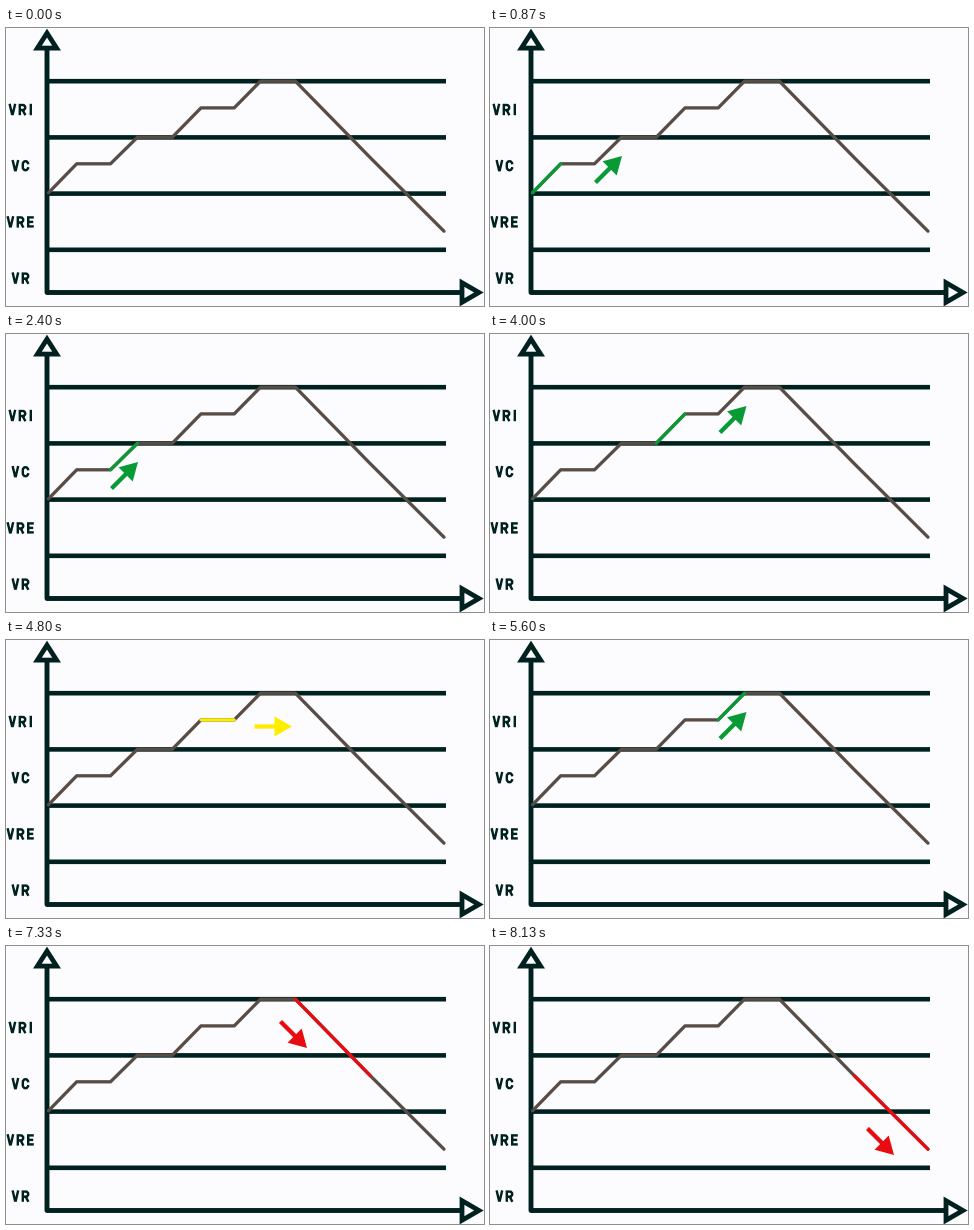
Write a matplotlib script that moves like this. It is 478 by 278 pixels and loops after 8.79 s.

```python
import matplotlib.pyplot as plt
from matplotlib.animation import FuncAnimation
from matplotlib.patches import PathPatch, Polygon
from matplotlib.path import Path
import numpy as np

W, H = 478, 278
DPI = 64
PX = 72 / DPI  # points per pixel
LOOP, STEP = 8790, 15

PAPER = "#fcfcff"
INK = "#00211f"
BROWN = "#584d46"
GREEN = "#079a35"
YELLOW = "#ffed00"
RED = "#e80b10"

fig = plt.figure(figsize=(W / DPI, H / DPI), dpi=DPI, facecolor=PAPER)
ax = fig.add_axes([0, 0, 1, 1])
ax.set_xlim(0, W)
ax.set_ylim(H, 0)
ax.axis("off")


def line(points, color, width, cap="butt", z=2):
    xs, ys = zip(*points)
    return ax.plot(xs, ys, color=color, lw=width * PX, zorder=z, snap=False,
                   solid_capstyle=cap, solid_joinstyle="round")[0]


def axis_head(points):
    ax.add_patch(Polygon(points, fc=PAPER, ec=INK, lw=4.8 * PX, snap=False,
                         joinstyle="miter", zorder=3))


# Letter strokes about 6 wide and 11 high: M move, L line, Q quadratic curve
GLYPHS = {
    "V": [("M", 0.2, -1.2), ("L", 2.6, 9), ("L", 3.4, 9), ("L", 5.8, -1.2)],
    "R": [("M", 0, 10.2), ("L", 0, 0), ("L", 3, 0), ("Q", 5.4, 0, 5.4, 2.5),
          ("Q", 5.4, 5, 3, 5), ("L", 0, 5), ("M", 2.8, 5), ("L", 5.6, 10.2)],
    "I": [("M", 0.6, -1.2), ("L", 0.6, 10.2)],
    "C": [("M", 5.4, 3.1), ("Q", 5.4, 0, 2.7, 0), ("Q", 0, 0, 0, 3),
          ("L", 0, 6), ("Q", 0, 9, 2.7, 9), ("Q", 5.4, 9, 5.4, 5.9)],
    "E": [("M", 5.6, 0), ("L", 0, 0), ("L", 0, 9), ("L", 5.6, 9),
          ("M", 0, 4.5), ("L", 5, 4.5)],
}
CODES = {"M": [Path.MOVETO], "L": [Path.LINETO], "Q": [Path.CURVE3] * 2}


def label(text, x, y):
    for i, letter in enumerate(text):
        verts, codes = [], []
        for op, *nums in GLYPHS[letter]:
            verts += [(x + 10.4 * i + a, y + b)
                      for a, b in zip(nums[::2], nums[1::2])]
            codes += CODES[op]
        ax.add_patch(PathPatch(Path(verts, codes), fc="none", ec=INK,
                               lw=2.4 * PX, capstyle="butt", snap=False,
                               joinstyle="miter", zorder=3))


def arrow(tip, degrees, color):
    """Solid arrow ending at tip; the angle turns clockwise from the right."""
    a = np.radians(degrees)
    along = np.array([np.cos(a), np.sin(a)])
    side = np.array([-along[1], along[0]])
    tip = np.array(tip)
    base = tip - 17.5 * along
    head = Polygon([tip, base + 10 * side, base - 10 * side],
                   fc=color, ec="none", zorder=6)
    ax.add_patch(head)
    return [head, line([tip - 37.5 * along, base + along], color, 4.3, z=6)]


# Grid, axes and labels
for k in range(4):
    y = 53.2 + 56.2 * k
    line([(41, y), (440, y)], INK, 4.6)
line([(41, 20), (41, 264.5), (457, 264.5)], INK, 4.9)
axis_head([(41, 5.1), (31.4, 20.1), (50.6, 20.1)])
axis_head([(472.9, 264.5), (456, 254.7), (456, 274.3)])
for text, x, y in (("VRI", 3.4, 77), ("VC", 6.4, 133.2),
                   ("VRE", 1.4, 189.4), ("VR", 6.4, 245.6)):
    label(text, x, y)

# Curve
ROUTE = [(42.5, 164.8), (70.7, 135.8), (104.5, 135.8), (131.5, 109.2),
         (166.3, 109.2), (195, 79.9), (228.2, 79.9), (254.5, 53.2),
         (289.4, 53.2), (364.4, 129.8), (438, 203.2)]
line(ROUTE, BROWN, 3.3, "round", 4)

UP = (GREEN, -45)
FLAT = (YELLOW, 0)
DOWN = (RED, 45)
STAGES = [
    (UP, (132, 128)), (FLAT, (148, 142)),
    (UP, (132, 128)), (FLAT, (148, 142)),
    (UP, (256.5, 72)), (FLAT, (286, 86.5)),
    (UP, (256.5, 72)), (FLAT, (286, 86.5)),
    (DOWN, (301, 102)), (DOWN, (404, 209)),
]
marks = []
for (color, angle), tip in STAGES:
    i = len(marks)
    stroke = line(ROUTE[i:i + 2], color, 3.2, "round", 5)
    marks.append([stroke] + arrow(tip, angle, color))


def update(frame):
    # One stage every 800 ms, after a pause with the bare curve
    stage = ((frame + 1) * STEP - 1) // 800 - 1
    for i, parts in enumerate(marks):
        for part in parts:
            part.set_visible(i == stage)
    return [part for parts in marks for part in parts]


anim = FuncAnimation(fig, update, frames=LOOP // STEP, interval=STEP,
                     init_func=lambda: update(0), repeat=True,
                     repeat_delay=0, cache_frame_data=False)
plt.show()
```
